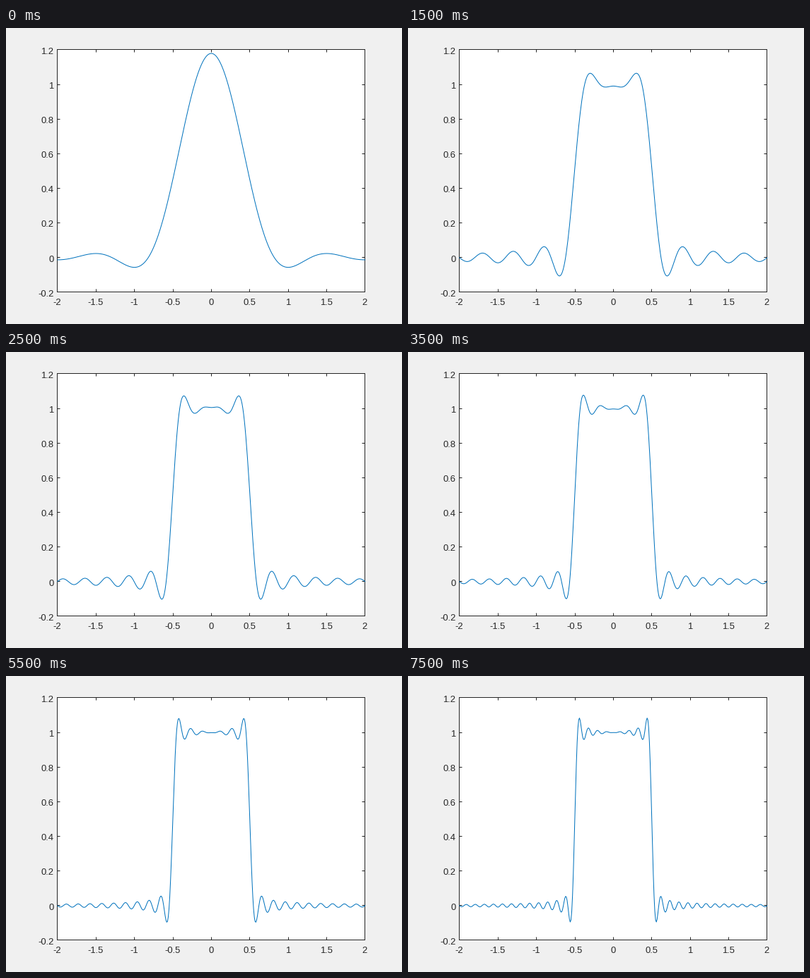
A matplotlib script that plays this animation: 560x420 px, repeating every 8 s.

```python
import numpy as np
import matplotlib.pyplot as plt
from matplotlib.animation import FuncAnimation
from matplotlib.transforms import ScaledTranslation

W, H, DPI = 560, 420, 100
PX = 72 / DPI                       # one pixel in points
# Just under half a pixel, so the frame snaps to columns 72/507, rows 30/374
LEFT, RIGHT, TOP, BOTTOM = 72.45, 507.45, 30.45, 374.45
INK, BLUE = "#262626", "#0072BD"
FRAMES, INTERVAL = 16, 500

plt.rcParams["font.family"] = "Liberation Sans"

# Sine integral, tabulated once by the trapezoid rule
u = np.linspace(0, 140, 70001)
s = np.sinc(u / np.pi)
si_table = np.concatenate(([0], np.cumsum((s[1:] + s[:-1]) / 2 * u[1])))


def si(v):
    return np.sign(v) * np.interp(np.abs(v), u, si_table)


def pulse(x, cutoff):
    """Unit pulse rebuilt from its spectrum up to the cutoff."""
    return (si(cutoff * (x + 0.5)) - si(cutoff * (x - 0.5))) / np.pi


fig = plt.figure(figsize=(W / DPI, H / DPI), dpi=DPI, facecolor="#F0F0F0")
ax = fig.add_axes([LEFT / W, 1 - BOTTOM / H,
                   (RIGHT - LEFT) / W, (BOTTOM - TOP) / H])
ax.set(xlim=(-2, 2), ylim=(-0.2, 1.2),
       xticks=np.linspace(-2, 2, 9), yticks=np.linspace(-0.2, 1.2, 8))
ax.tick_params(direction="in", length=4.35 * PX, width=PX, color=INK,
               top=True, right=True, labelbottom=False, labelleft=False)
for spine in ax.spines.values():
    spine.set(color=INK, linewidth=PX)


def label(px, py, value, ha):
    fig.text(px / W, 1 - py / H, f"{round(value, 1) + 0.0:g}", ha=ha,
             va="baseline", size=13 * PX, color=INK)


for v in np.linspace(-2, 2, 9):
    label(LEFT + (v + 2) / 4 * (RIGHT - LEFT), 393.4, v, "center")
for v in np.linspace(-0.2, 1.2, 8):
    label(67.5, BOTTOM - (v + 0.2) / 1.4 * (BOTTOM - TOP) + 6.2, v, "right")

# The curve is not snapped, so it sits a fraction of a pixel off the frame
nudge = ScaledTranslation(0.35 / DPI, -0.45 / DPI, fig.dpi_scale_trans)
x = np.linspace(-2, 2, 401)
curve, = ax.plot(x, pulse(x, 2 * np.pi), color=BLUE, lw=PX, zorder=3,
                 clip_on=False, transform=ax.transData + nudge)


def draw(i):
    curve.set_ydata(pulse(x, (i + 2) * np.pi))
    return curve,


anim = FuncAnimation(fig, draw, frames=FRAMES, interval=INTERVAL,
                     repeat=True, repeat_delay=0)
plt.show()
```
